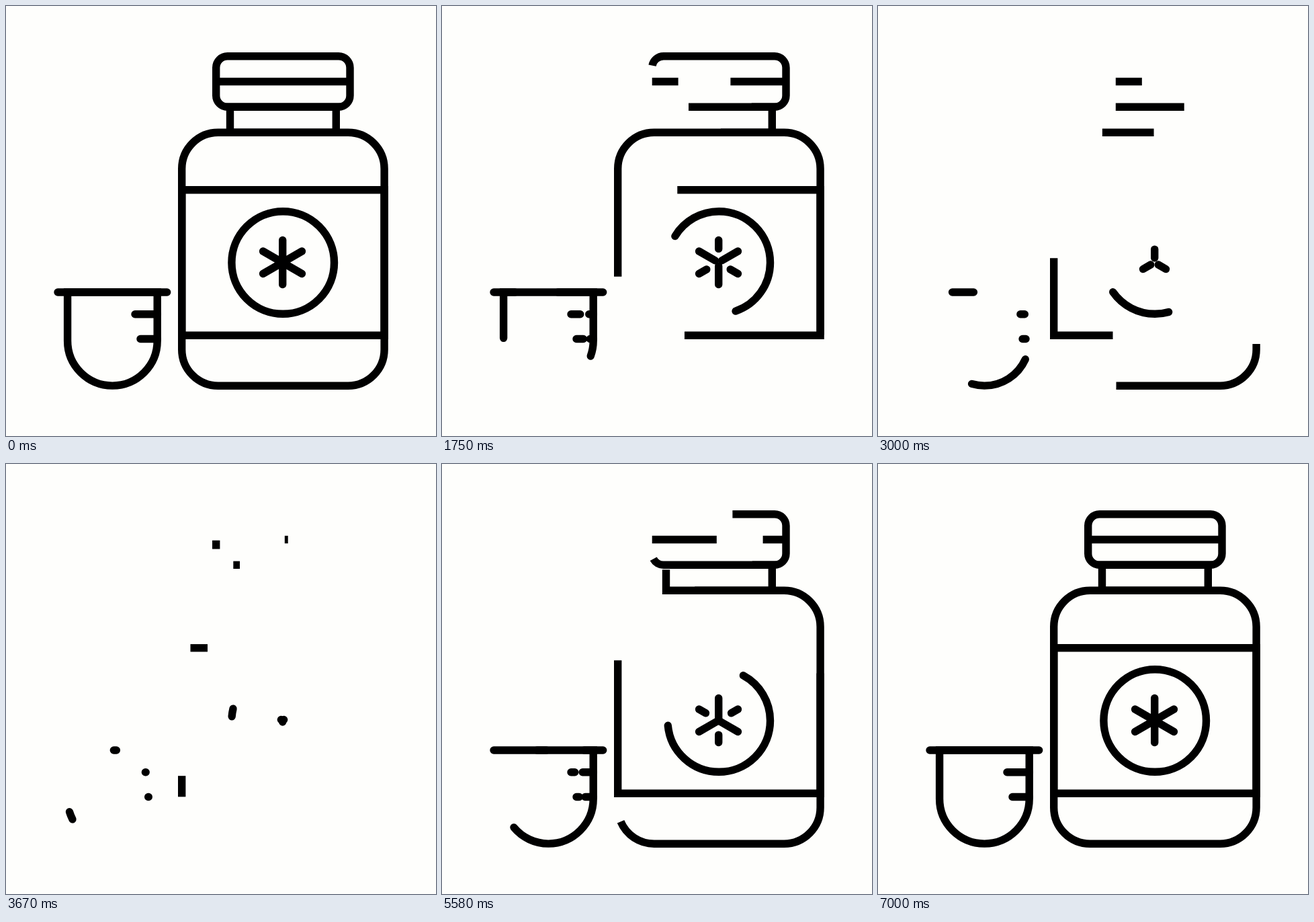
Animation of 640 by 640 pixels, one loop 7080 ms. Source, as an HTML page with a canvas:

```html
<!DOCTYPE html>
<html lang="en">
<head>
<meta charset="utf-8">
<title>Medicine bottle</title>
<style>
html, body { margin: 0; width: 100%; height: 100%; overflow: hidden; background: #fefefc; }
canvas { display: block; width: 640px; height: 640px; }
</style>
</head>
<body>
<canvas id="stage" width="640" height="640"></canvas>
<script>
const ctx = document.getElementById('stage').getContext('2d');
const LOOP = 7080, STEP = 1000 / 12;
const ERASE = 6.85, TURN = 43.1, DONE = 79.6; // in steps
const PI = Math.PI;
const clamp = x => Math.min(1, Math.max(0, x));

// Closed outlines: length, start point and one lap from that point
function roundRect(l, t, r, b, rad) {
  return {
    cap: 'butt', x: r, y: t + rad,
    len: 2 * (r - l + b - t) - 8 * rad + 2 * PI * rad,
    lap() {
      ctx.lineTo(r, b - rad);
      ctx.arc(r - rad, b - rad, rad, 0, PI / 2);
      ctx.arc(l + rad, b - rad, rad, PI / 2, PI);
      ctx.arc(l + rad, t + rad, rad, PI, PI * 1.5);
      ctx.arc(r - rad, t + rad, rad, PI * 1.5, PI * 2);
    }
  };
}

function rect(l, t, r, b) {
  return {
    cap: 'butt', x: r, y: b,
    len: 2 * (r - l + b - t),
    lap() {
      ctx.lineTo(l, b);
      ctx.lineTo(l, t);
      ctx.lineTo(r, t);
      ctx.lineTo(r, b);
    }
  };
}

function circle(x, y, rad) {
  return {
    cap: 'round', x: x + rad, y,
    len: 2 * PI * rad,
    lap() { ctx.arc(x, y, rad, 0, 2 * PI); }
  };
}

function cup(l, t, r, base) {
  const rad = (r - l) / 2;
  return {
    cap: 'round', x: r, y: t,
    len: r - l + 2 * (base - t) + PI * rad,
    lap() {
      ctx.lineTo(r, base);
      ctx.arc(l + rad, base, rad, 0, PI);
      ctx.lineTo(l, t);
      ctx.lineTo(r, t);
    }
  };
}

const outlines = [
  roundRect(312.7, 74.8, 512, 150.3, 17),
  rect(333.5, 150.3, 491.3, 188.3),
  roundRect(261.7, 188.3, 563.1, 565.2, 54),
  rect(261.7, 273.8, 563.1, 490.3),
  circle(412.2, 382, 76.3),
  cup(91.6, 426, 225.2, 498.3)
];

// Open lines: x1, y1, x2, y2, cap
const lines = [
  [312.7, 112.5, 512, 112.5, 'butt'],
  [411.7, 348.5, 411.7, 414.5, 'round'],
  [440.5, 398.5, 382.5, 365, 'round'],
  [382.5, 398.5, 440.5, 365, 'round'],
  [77, 426, 239.7, 426, 'round'],
  [225.2, 458.7, 192, 458.7, 'round'],
  [225.2, 495.5, 200, 495.5, 'round']
];

function drawOutline(s, from, size) {
  ctx.lineCap = s.cap;
  ctx.beginPath();
  ctx.moveTo(s.x, s.y);
  s.lap();
  if (size >= 1) {
    ctx.closePath();
  } else {
    // a second lap lets the visible stretch run past the start point
    s.lap();
    ctx.setLineDash([size * s.len, 1e5]);
    ctx.lineDashOffset = -from * s.len;
  }
  ctx.stroke();
  ctx.setLineDash([]);
}

function drawLine([x1, y1, x2, y2, cap], from, size) {
  const part = (a, b) => {
    ctx.moveTo(x1 + (x2 - x1) * a, y1 + (y2 - y1) * a);
    ctx.lineTo(x1 + (x2 - x1) * b, y1 + (y2 - y1) * b);
  };
  const to = from + size;
  ctx.lineCap = cap;
  ctx.beginPath();
  part(from, Math.min(1, to));
  if (to > 1) part(0, to - 1);
  ctx.stroke();
}

function draw(ms) {
  const n = Math.floor((ms % LOOP + 5) / STEP);
  const out = clamp((n - ERASE) / (TURN - ERASE));
  const back = clamp((n - TURN) / (DONE - TURN));
  const erasing = n < TURN;
  const size = erasing ? 1 - out : back;
  const from = ((out + back) / 2 + (erasing ? out : 0)) % 1;

  ctx.fillStyle = '#fefefc';
  ctx.fillRect(0, 0, 640, 640);
  ctx.strokeStyle = '#000';
  ctx.lineWidth = 11.4;
  ctx.lineJoin = 'miter';
  if (size > 0) {
    outlines.forEach(s => drawOutline(s, from, size));
    lines.forEach(l => drawLine(l, from, size));
  }
}

const begin = performance.now();
function tick() {
  draw(performance.now() - begin);
  requestAnimationFrame(tick);
}
tick();
</script>
</body>
</html>
```
